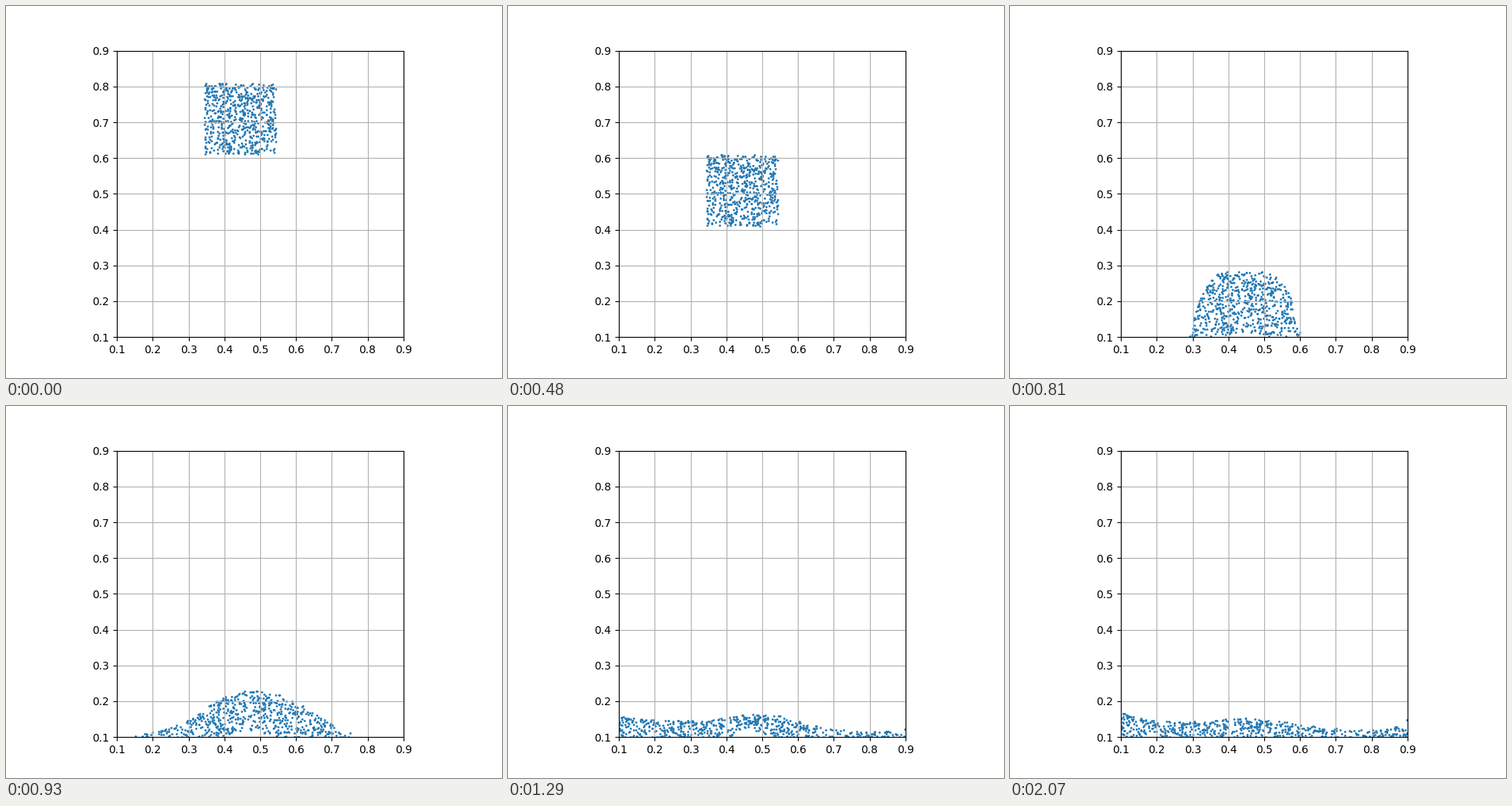
Recreate the animation shown at these times as a matplotlib script. Size 640x480 px, loop 2.1 s.

```python
import numpy as np
import matplotlib.pyplot as plt
from matplotlib.animation import FuncAnimation

FRAMES = 70
INTERVAL = 30
COUNT = 640
GRAVITY = 0.1 / 64
IMPACT = 24

rng = np.random.default_rng(21)
u, v = rng.random((2, COUNT))
block = np.column_stack([0.344 + 0.2 * u, 0.611 + 0.198 * v])


def fall(n):
    """Block in free fall."""
    return block - [0, GRAVITY * n * n / 2]


def bump(x, center, width, height):
    return height * np.exp(-((x - center) / width) ** 2)


def pool(left, right, surface, hollow=0.0, center=0.45, width=0.08):
    """Fill the area under a surface, keeping the area per particle.

    The bottom lies just below the axis and may bulge up into a hollow.
    """
    def bottom(x):
        return 0.09 + bump(x, center, width, hollow)

    xs = np.linspace(left, right, 600)
    mass = np.cumsum(surface(xs) - bottom(xs))
    mass = (mass - mass[0]) / (mass[-1] - mass[0])
    x = np.interp(u, mass, xs)
    return np.column_stack([x, bottom(x) + v * (surface(x) - bottom(x))])


def dome(x):
    return 0.1 + 0.184 * (1 - np.abs((x - 0.4475) / 0.1555) ** 4.4)


def spread(x):
    return 0.1 + bump(x, 0.49, 0.2, 0.12)


def wave(x):
    return 0.11 + bump(x, 0.51, 0.13, 0.07) + bump(x, 0.22, 0.2, 0.042)


def rest(x):
    walls = 0.05 * np.exp((0.1 - x) / 0.13) + 0.035 * np.exp((x - 0.9) / 0.025)
    return 0.12 + walls + bump(x, 0.46, 0.17, 0.03)


knots = np.array([IMPACT, 27, 32, 36, 54])
poses = np.array([
    fall(IMPACT),
    pool(0.292, 0.603, dome, hollow=0.024),
    pool(0.13, 0.79, spread, hollow=0.03, center=0.47),
    pool(0.101, 0.9, wave, hollow=0.045, center=0.46, width=0.06),
    pool(0.101, 0.9, rest, hollow=0.008),
])


def tangents():
    """Harmonic mean of neighbouring slopes, so that nothing overshoots."""
    slopes = np.diff(poses, axis=0) / np.diff(knots)[:, None, None]
    a, b = slopes[:-1], slopes[1:]
    same = a * b > 0
    tan = np.zeros_like(poses)
    tan[0, :, 1] = -GRAVITY * IMPACT
    tan[1:-1] = np.where(same, 2 * a * b / np.where(same, a + b, 1), 0)
    return tan


speeds = tangents()


def positions(n):
    if n <= IMPACT:
        return fall(n)
    n = min(n, knots[-1])
    i = np.searchsorted(knots, n) - 1
    h = knots[i + 1] - knots[i]
    t = (n - knots[i]) / h
    return ((1 + 2 * t) * (1 - t) ** 2 * poses[i]
            + t * (1 - t) ** 2 * h * speeds[i]
            + t * t * (3 - 2 * t) * poses[i + 1]
            + t * t * (t - 1) * h * speeds[i + 1])


fig, ax = plt.subplots(figsize=(6.4, 4.8), dpi=100)
ax.set_aspect("equal")
ax.set_xlim(0.1, 0.9)
ax.set_ylim(0.1, 0.9)
ax.grid(True)
dots = ax.scatter(*block.T, s=1)


def update(n):
    dots.set_offsets(positions(n))
    return (dots,)


anim = FuncAnimation(fig, update, frames=FRAMES, interval=INTERVAL,
                     repeat=True, repeat_delay=0)
plt.show()
```
